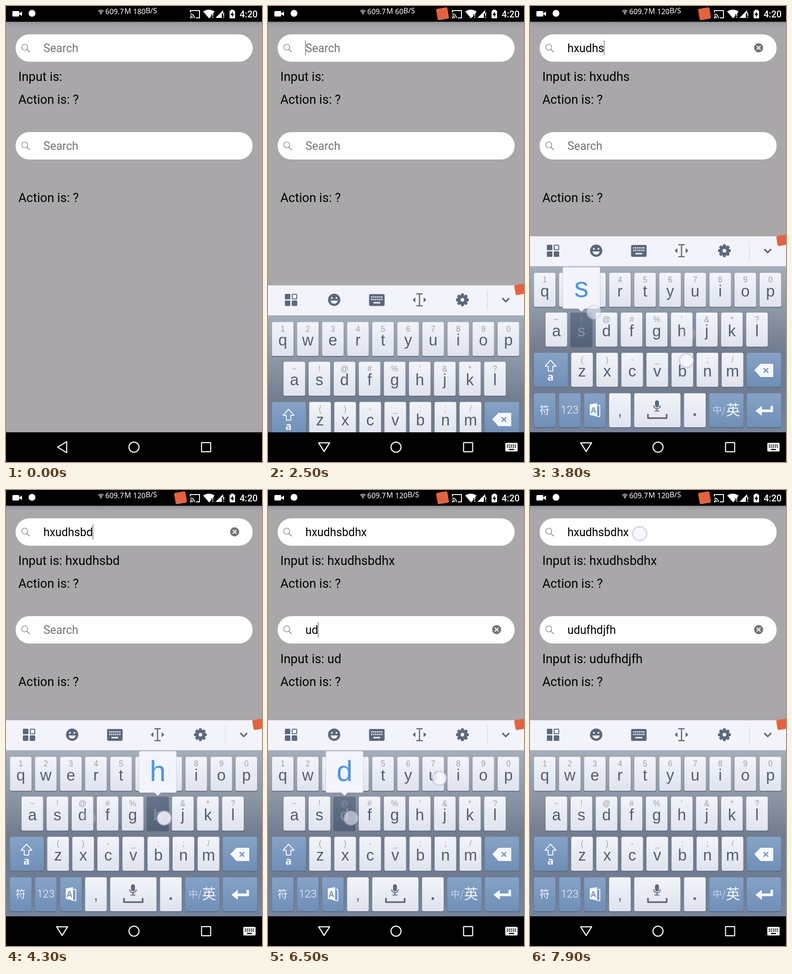
An HTML page with a canvas for the animation above (8 s loop, 561 px wide and 998 px high).

```html
<!DOCTYPE html>
<html lang="en">
<head>
<meta charset="utf-8">
<title>Search fields</title>
<style>
html, body { margin: 0; width: 100%; height: 100%; overflow: hidden; background: #000; }
canvas { display: block; }
</style>
</head>
<body>
<canvas id="stage" width="561" height="998"></canvas>
<script>
const c = document.getElementById('stage').getContext('2d');
const ROBOTO = 'Roboto, sans-serif', ARIAL = '"Liberation Sans", sans-serif';
const NOTO = '"Noto Sans", sans-serif', CJK = '"Noto Sans CJK SC", "Noto Sans CJK", sans-serif';
const INK = '#5b687d', LOOP = 8000, STEP = 100;

// Drawing helpers
function text(s, x, y, size, color, font = ROBOTO, align = 'left', weight = 400) {
  c.font = `${weight} ${size}px ${font}`;
  c.textAlign = align;
  c.fillStyle = color;
  c.fillText(s, x, y);
}
function box(x, y, w, h, color, r = 0) {
  c.beginPath();
  c.roundRect(x, y, w, h, r);
  c.fillStyle = color;
  c.fill();
}
function frame(x, y, w, h, color, width, r = 0) {
  c.beginPath();
  c.roundRect(x, y, w, h, r);
  c.strokeStyle = color;
  c.lineWidth = width;
  c.stroke();
}
function disc(x, y, r, color) {
  c.beginPath();
  c.arc(x, y, r, 0, 7);
  c.fillStyle = color;
  c.fill();
}
function arc(x, y, r, color, width, from = 0, to = 2 * Math.PI) {
  c.beginPath();
  c.arc(x, y, r, from, to);
  c.strokeStyle = color;
  c.lineWidth = width;
  c.stroke();
}
function fill(d, color) {
  c.fillStyle = color;
  c.fill(new Path2D(d));
}
function line(d, color, width) {
  c.strokeStyle = color;
  c.lineWidth = width;
  c.stroke(new Path2D(d));
}
function shade(y0, y1, ...colors) {
  const g = c.createLinearGradient(0, y0, 0, y1);
  colors.forEach((k, i) => g.addColorStop(i / (colors.length - 1), k));
  return g;
}
function badge(x, y, size) {
  c.save();
  c.translate(x, y);
  c.rotate(-0.17);
  box(-size / 2, -size / 2, size, size, '#e6623c', 3);
  c.restore();
}

// Keyboard layout
const PITCH = 54.95, KEY_W = 47.5, KEY_H = 74.5;
const keys = {};
[['qwertyuiop', '1234567890', 8.5, 584],
 ['asdfghjkl', "~!@#%'&*?", 34, 671],
 ['zxcvbnm', '()-_:;/', 90.3, 759]].forEach(([row, hints, x, y]) =>
  [...row].forEach((ch, i) => keys[ch] = { x: x + i * PITCH, y, hint: hints[i] }));

// Typing: letter, press time, touch point when it differs from the usual one
const typed = [
  [['h', 2900, 349, 698], ['x', 3100, 172, 760], ['u', 3200], ['d', 3300], ['h', 3500],
   ['s', 3600, 140, 670], ['b', 3800, 343, 776], ['d', 4000], ['h', 4200], ['x', 4500]],
  [['u', 6100], ['d', 6300], ['u', 6500], ['f', 6700, 205, 748], ['h', 6900, 357, 748],
   ['d', 7100], ['j', 7300], ['f', 7400], ['h', 7500]]
];
const presses = typed.flat();
const taps = [[90.5, 100.5, 1700], [240, 309, 5700], [240.5, 95.5, 7900]];
const rates = [[0, 180], [300, 120], [1200, 60], [3500, 120], [4900, 180], [5300, 60], [6000, 120]];
const carets = [
  [[1900, 4900], [5200, 5500]],
  [[300, 1200], [1400, 1900], [5900, 7800]]
];
const within = (t, spans) => spans.some(([a, b]) => t >= a && t < b);
const textAt = (list, t) => list.filter(k => t >= k[1] + 200).map(k => k[0]).join('');

function statusBar(t) {
  const W = '#fff';
  box(0, 0, 561, 34.5, '#000');
  box(14, 11, 15, 12, W, 2);
  fill('M28 17L35 12V22Z', W);
  disc(57, 16, 7.5, W);

  disc(208, 17, 1.3, W);
  [3.5, 6.5, 9.5].forEach(r => arc(208, 17.5, r * .9, W, 1.3, -2.35, -.8));
  const rate = rates.filter(r => t >= r[0]).pop()[1] + '';
  text('609.7', 217.5, 18, 16, W, NOTO);
  text('M', 259.5, 16.5, 16, W, NOTO);
  text(rate, 278.5, 17.5, 16, W, NOTO);
  text('B/S', 278.5 + rate.length * 9.15, 16, 16, W, NOTO);

  if (t >= 2400) badge(382.5, 17, 25);
  line('M404 14V10H424V26H416', W, 2);
  disc(405, 25.5, 1.8, W);
  [5, 9].forEach(r => arc(404, 26.5, r, W, 1.8, -Math.PI / 2, 0));
  fill('M432 12Q444 4 457 12L453 18H450V22L445 27Z', W);
  text('!', 453, 26, 15, W, ROBOTO, 'center', 700);
  fill('M459 26L476 9V16H473V26Z', W);
  text('!', 477, 26, 15, W, ROBOTO, 'center', 700);
  box(490, 10, 12, 17, W, 1.5);
  box(493, 8, 6, 3, W);
  fill('M497 12L492 20H495.500V25L500 17H497Z', '#000');
  text('4:20', 512, 24.5, 20, W, ROBOTO, 'left', 500);
}

function searchField(y, value, caret, clear) {
  box(21, y, 519.5, 60, '#fefefe', 30);
  arc(41, y + 28, 6.5, '#999', 1.7);
  line(`M45.700 ${y + 33}L52 ${y + 39.3}`, '#999', 2);
  text(value || 'Search', 82, y + 38.7, 24.9, value ? '#000' : '#747474');
  if (caret) box(82 + (value ? c.measureText(value).width : 0) - .5, y + 13, 1.3, 33, '#666');
  if (clear) {
    disc(501, y + 29.5, 10, '#757578');
    line(`M497 ${y + 25.5}l8 8m0 -8l-8 8`, '#fff', 2.2);
  }
}

function page(t) {
  box(0, 0, 561, 998, '#a9a7aa');
  box(0, 34, 561, 14, shade(34, 48, '#8c9095', '#a2a2a6', '#a9a7aa'));
  const [first, second] = typed.map(list => textAt(list, t));
  const inSecond = t >= 5900;
  searchField(62, first, within(t, carets[0]), first && !inSecond);
  searchField(276, second, within(t, carets[1]), second && inSecond);
  text('Input is: ' + first, 27, 164.3, 27.4, '#000');
  text('Action is: ?', 27, 214.3, 27.4, '#000');
  if (second) text('Input is: ' + second, 27, 378.5, 27.4, '#000');
  text('Action is: ?', 27, 428.5, 27.4, '#000');
}

function navBar(t) {
  const W = '#f4f4f4', open = t >= 2000;
  box(0, 933, 561, 65, '#000');
  c.lineJoin = 'round';
  line(open ? 'M111 956H135L123 975Z' : 'M113 965.500L133 953.500V977.500Z', W, 2.4);
  arc(280.5, 965.5, 11, W, 2.4);
  frame(428.5, 955.5, 20, 20, W, 2.4, 1);
  if (!open) return;
  box(520, 956, 27, 19, W, 2);
  for (let i = 0; i < 10; i++)
    box(523.5 + i % 5 * 4.3, 960 + (i > 4) * 4, 2.4, 2.4, '#000');
  box(528, 969.5, 11, 2.4, '#000');
}

function toolbar() {
  const paper = '#f3f4fb';
  box(0, 504, 561, 66, paper);
  box(37, 522.5, 12, 12, INK, 1.5);
  frame(53, 523.5, 10, 10, INK, 2, 1);
  box(37, 537, 12, 12, INK, 1.5);
  box(52, 537, 12, 12, INK, 1.5);

  disc(145, 535.5, 13.5, INK);
  disc(140, 531.5, 2, paper);
  disc(150, 531.5, 2, paper);
  c.beginPath();
  c.arc(145, 536, 8, .15, Math.PI - .15);
  c.fillStyle = paper;
  c.fill();

  box(221.5, 523, 34, 26, INK, 3);
  for (let i = 0; i < 12; i++)
    box(226 + i % 6 * 4.4, 528 + (i > 5) * 5.5, 2.8, 2.8, paper);
  box(231, 540.5, 15, 3, paper);

  line('M325 522.500H339M325 548.500H339M332 522V549', INK, 2.6);
  fill('M317 535.500L323 530V541ZM347 535.500L341 530V541Z', INK);

  for (let i = 0; i < 8; i++) {
    c.save();
    c.translate(426, 535.5);
    c.rotate(i * Math.PI / 4);
    box(-3.2, -14, 6.4, 7, INK, 1.5);
    c.restore();
  }
  disc(426, 535.5, 10.8, INK);
  disc(426, 535.5, 4, paper);

  box(480, 516, 1.2, 40, '#d2d5de');
  line('M513.500 532L521 539.500L528.500 532', INK, 3.2);
  badge(552, 513, 22);
}

function cap(x, y, w, kind = 'light') {
  const tone = { light: ['#f2f4fa', '#e0e3ed'], blue: ['#86a2c6', '#6f8fb8'], down: ['#65748a', '#526176'] }[kind];
  box(x - .5, y, w + 1, KEY_H + 1.7, '#596679', 4);
  box(x, y, w, KEY_H, shade(y, y + KEY_H, ...tone), 3.5);
}

function controlKeys() {
  const W = '#f6f8fc';
  cap(8.5, 759, 74.5, 'blue');
  line('M45 775L57 788.500H50V799H40V788.500H33Z', W, 2);
  text('a', 45, 820, 23, W, NOTO, 'center', 600);
  cap(475, 759, 75.5, 'blue');
  fill('M491.500 797L505 783H533V812H505Z', W);
  line('M512 792.500l10 10m0 -10l-10 10', '#7897bf', 2.6);

  cap(8.5, 847.5, KEY_W, 'blue');
  text('符', 32, 892, 22, W, CJK, 'center');
  cap(63.5, 847.5, KEY_W, 'blue');
  text('123', 87, 892, 23.5, W, ROBOTO, 'center', 300);
  cap(118.4, 847.5, KEY_W, 'blue');
  fill('M131 872L147 869V898L131 895Z', W);
  line('M148 874H153V899L143 897', W, 2);
  text('A', 139, 891, 18, '#7896be', ARIAL, 'center', 700);
  cap(173.3, 847.5, KEY_W);
  text(',', 197, 897, 34, INK, ARIAL, 'center');
  cap(228.3, 847.5, 101.5);
  box(274, 863, 8.5, 15.5, INK, 4.2);
  arc(278.2, 874, 7.5, INK, 2, 0, Math.PI);
  line('M278.200 881V886M273 886.500H283.500', INK, 2);
  line('M258.500 893V902H299.500V893', INK, 3.6);
  cap(337.5, 847.5, KEY_W);
  text('.', 361, 897, 36, INK, ARIAL, 'center', 700);
  cap(392.5, 847.5, 75.5, 'blue');
  text('中/', 400, 892, 20.5, '#c9d6e8', CJK);
  text('英', 445, 895, 31, W, CJK, 'center');
  cap(475, 847.5, 75.5, 'blue');
  fill('M494 886L508 875V883H527V875H532.500V889H508V897Z', W);
}

function keyboard(t) {
  if (t < 2400) return;
  const left = Math.max(0, 1 - (t - 2300) / 400);
  c.save();
  c.translate(0, 430 * left * left);
  toolbar();
  box(0, 569.5, 561, 364, shade(570, 933, '#a4adba', '#8e99a8', '#727e90', '#6f7c91', '#76859c'));
  const active = presses.filter(k => t >= k[1] + 100 && t <= k[1] + 200).pop();
  for (const ch in keys) {
    const { x, y, hint } = keys[ch], mid = x + KEY_W / 2, down = active && active[0] === ch;
    cap(x, y, KEY_W, down ? 'down' : 'light');
    text(hint, mid, y + 21, 17.5, down ? '#8592a5' : '#9aa1ae', ARIAL, 'center');
    text(ch, mid, y + 51.5, 34.5, down ? '#8995a7' : '#535e70', ARIAL, 'center');
  }
  controlKeys();
  if (active) {
    const { x, y } = keys[active[0]], mid = x + KEY_W / 2, top = y - 99.5;
    box(mid - 41.5, top, 83, 92.5, 'rgba(70,80,100,.35)', 3);
    box(mid - 41, top, 82, 91, '#f3f4fc', 3);
    fill(`M${mid - 7} ${top + 90.5}h14l-7 7Z`, '#f3f4fc');
    text(active[0], mid, top + 65, 63, '#4796ec', ARIAL, 'center');
  }
  c.restore();
}

function touch(x, y, alpha) {
  if (alpha <= 0) return;
  c.globalAlpha = alpha;
  disc(x, y, 17, 'rgba(190,195,215,.3)');
  disc(x, y, 14.5, 'rgba(250,250,255,.8)');
  arc(x, y, 15, 'rgba(190,190,228,.75)', 2);
  c.globalAlpha = 1;
}

function touches(t) {
  for (const [ch, start, x, y] of presses) {
    const age = t - start, k = keys[ch];
    if (age < 0 || age > 300) continue;
    const alpha = age < 200 ? 1 : age < 300 ? .6 : .2;
    touch(x || k.x + KEY_W / 2 + 14, y || k.y + 47, alpha);
  }
  for (const [x, y, start] of taps) {
    const age = t - start;
    if (age >= 0) touch(x, y, Math.min(1, 1 - (age - 200) / 500));
  }
}

function draw(now) {
  const t = Math.floor(now % LOOP / STEP) * STEP;
  page(t);
  statusBar(t);
  keyboard(t);
  navBar(t);
  touches(t);
  requestAnimationFrame(draw);
}
const begin = performance.now();
const tick = draw;
requestAnimationFrame(tick);
</script>
</body>
</html>
```
